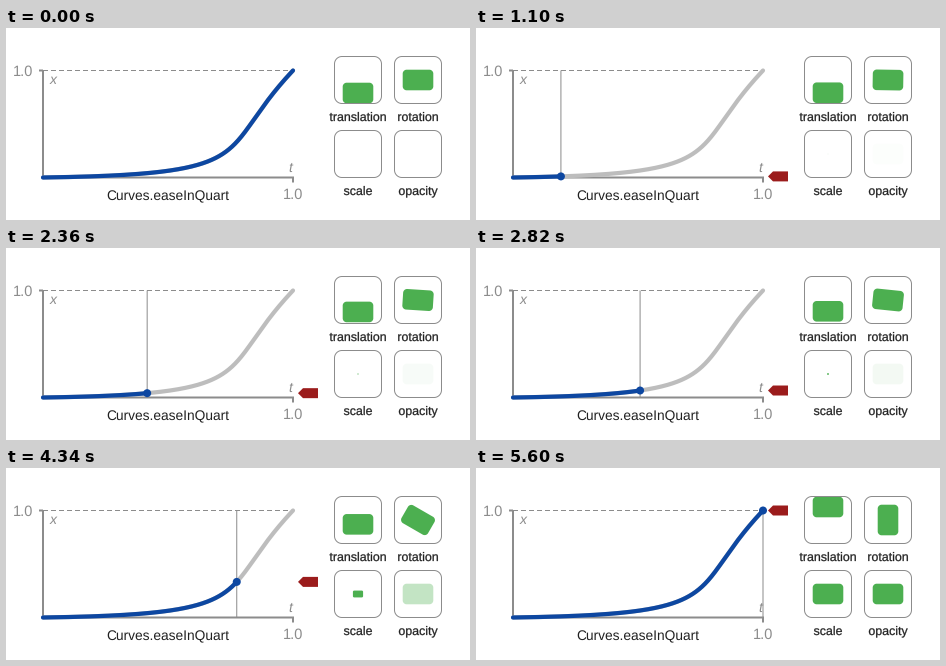
A matplotlib script for the animation above (5.62 s loop, 464 by 192 pixels).

```python
import numpy as np
import matplotlib.pyplot as plt
from matplotlib.animation import FuncAnimation
from matplotlib.patches import Circle, Polygon
from matplotlib.patheffects import Stroke
from matplotlib.transforms import Affine2D

W, H, DPI = 464, 192, 72  # at 72 dpi one point is one pixel
TICK, LOOP, STEPS = 20, 5620, 120
X0, Y0, GW, GH = 37, 149.5, 250, 107
GRAY, PALE, BLUE = "#8c8c8c", "#bdbdbd", "#0d47a1"
RED, GREEN, INK = "#9b1c1c", "#4caf50", "#212121"

plt.rcParams["font.family"] = "Liberation Sans"
plt.rcParams["text.hinting"] = "none"
fig = plt.figure(figsize=(W / DPI, H / DPI), dpi=DPI, facecolor="white")
ax = fig.add_axes([0, 0, 1, 1])
ax.set(xlim=(0, W), ylim=(H, 0))
ax.axis("off")


def bezier(s, a, b):
    return 3 * (1 - s) ** 2 * s * a + 3 * (1 - s) * s**2 * b + s**3


s = np.linspace(0, 1, 400)
ts = bezier(s, 0.895, 0.685)
vs = bezier(s, 0.03, 0.22)


def to_px(t, v):
    return X0 + GW * t, Y0 - GH * v


def line(xs, ys, color=GRAY, lw=1, z=1, **kw):
    kw.setdefault("solid_capstyle", "butt")
    return ax.plot(xs, ys, color=color, lw=lw, zorder=z, snap=False, **kw)[0]


def label(x, y, text, size, color=GRAY, **kw):
    return ax.text(x, y, text, fontsize=size, color=color, ha="center",
                   va="baseline", **kw)


def round_rect(x, y, w, h, r, z, **kw):
    """Rounded rectangle with circular corners, centred on (x, y)."""
    a = (np.arange(96) + 0.5) * np.pi / 48
    c, s = np.cos(a), np.sin(a)
    px = x + (w / 2 - r) * np.sign(c) + r * c
    py = y + (h / 2 - r) * np.sign(s) + r * s
    return ax.add_patch(Polygon(np.column_stack([px, py]), zorder=z, **kw))


def chip():
    return round_rect(0, 0, 30.6, 20.6, 4, 2, fc=GREEN, ec="none")


def place(patch, x, y, angle=0, scale=1):
    move = Affine2D().scale(scale).rotate_deg(angle).translate(x, y)
    patch.set_transform(move + ax.transData)


# Graph
line([X0, X0], [42, Y0 + 1], lw=2)
line([X0 - 1, 288], [Y0, Y0], lw=2)
line([33, X0], [42.5, 42.5], lw=2)
line([287, 287], [Y0, 154.5], lw=2)
line([X0, 287], [42.5, 42.5], dashes=(5, 3))
label(17.2, 48, "1.0", 14.6)
label(287, 170.5, "1.0", 14.6)
label(47, 55.5, "x", 14, style="italic")
label(284.5, 144, "t", 14, style="italic")
label(162.2, 172, "Curves.easeInQuart", 13.8, INK)

line(*to_px(ts, vs), PALE, 4.2, 3, solid_capstyle="round")
done = line([], [], BLUE, 4.2, 5, solid_capstyle="round")
cursor = line([], [], z=4)
dot = ax.add_patch(Circle((0, 0), 4, fc=BLUE, ec="none", zorder=6))
arrow = ax.add_patch(Polygon(
    [(292, 0), (297, -5), (312, -5), (312, 5), (297, 5)],
    fc=RED, ec="none", zorder=4))

# Preview boxes
medium = [Stroke(linewidth=0.25, foreground=INK)]
boxes = []
for x, y, name in [(352, 52, "translation"), (412, 52, "rotation"),
                   (352, 126, "scale"), (412, 126, "opacity")]:
    boxes.append(round_rect(x, y, 47, 47, 7.5, 3, fc="none", ec=GRAY, lw=1))
    label(x, y + 41, name, 12.4, INK, path_effects=medium)

slider, spinner, grower, fader = (chip() for _ in range(4))
slider.set_clip_path(boxes[0])
place(fader, 412, 126)


def update(i):
    cycle, rest = divmod(i * TICK, 140)
    step = 3 * cycle + (rest >= 20) + (rest >= 120)
    t = step / STEPS
    v = np.interp(t, ts, vs)
    x, y = to_px(t, v)

    # The first step shows the whole curve, without cursor
    running = step > 0
    end = (t, v) if running else (1, 1)
    keep = ts < end[0]
    done.set_data(*to_px(np.append(ts[keep], end[0]),
                         np.append(vs[keep], end[1])))
    for part in (cursor, dot, arrow, grower, fader):
        part.set_visible(running)
    cursor.set_data([x, x], [42.5, Y0])
    dot.center = x, y
    place(arrow, 0, y)

    place(slider, 352, 65 - 26 * v)
    place(spinner, 412, 52, angle=90 * v)
    place(grower, 352, 126, scale=max(v, 1e-3))
    fader.set_alpha(v)
    return done, cursor, dot, arrow, slider, spinner, grower, fader


anim = FuncAnimation(fig, update, frames=LOOP // TICK, interval=TICK,
                     repeat=True, cache_frame_data=False)
plt.show()
```
